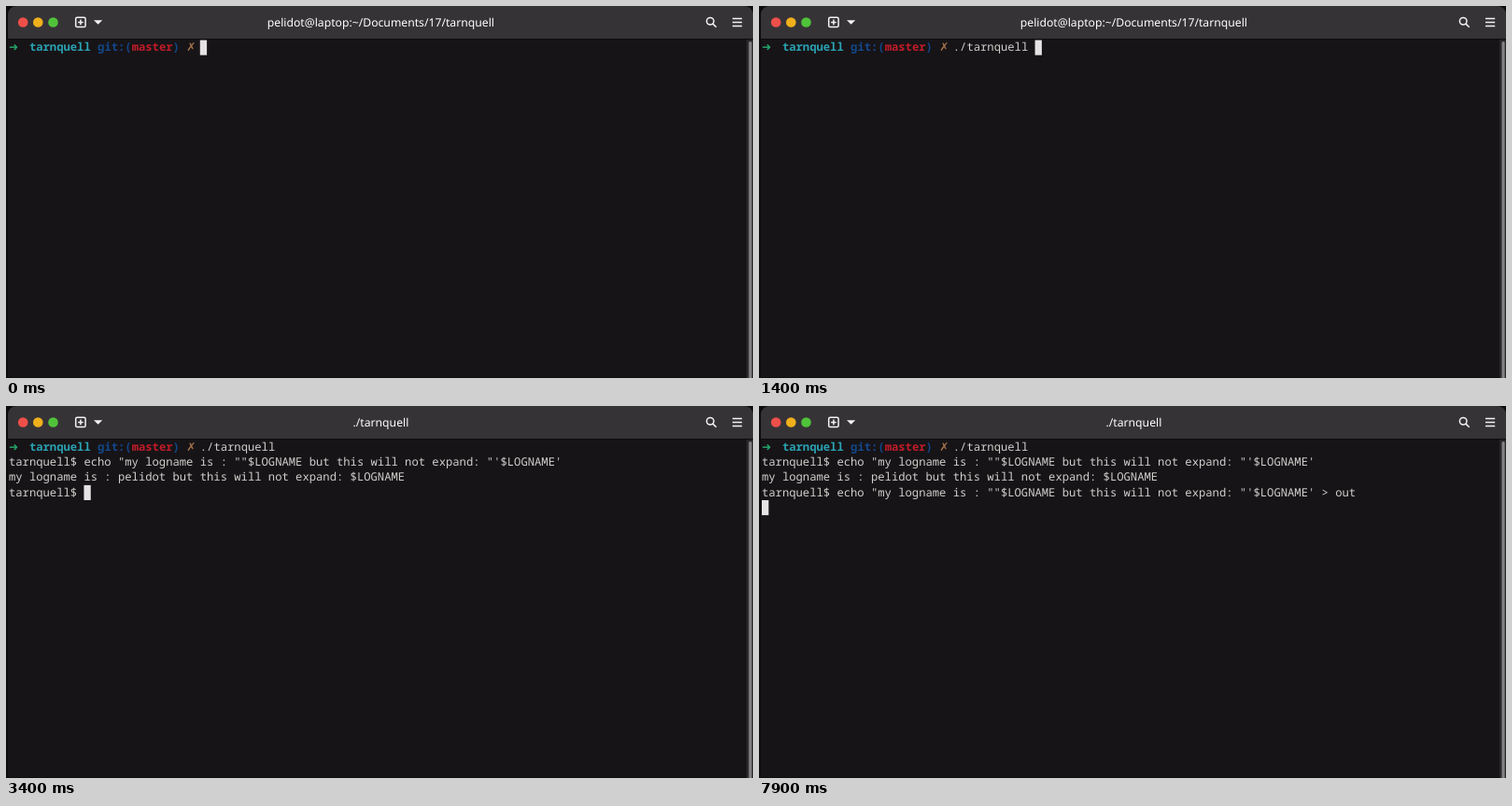
These frames come from a looping animation (800x399 px, 8000 ms). An HTML page:

```html
<!DOCTYPE html>
<html lang="en">
<head>
<meta charset="utf-8">
<title>Terminal</title>
<style>
  html, body { margin: 0; width: 100%; height: 100%; overflow: hidden; background: #171417; }
  svg { display: block; width: 100vw; height: 100vh; }
  text { white-space: pre; text-rendering: geometricPrecision; }
  .title { font: 12.2px "Noto Sans", "Open Sans", sans-serif; fill: #fff; text-anchor: middle; }
  .term { font: 12.19px "Noto Sans Mono", "DejaVu Sans Mono", monospace; fill: #d0cfcc; }
  .bold { font-weight: 700; }
  .symbol { font-family: "DejaVu Sans", sans-serif; }
  .icon { fill: none; stroke: #f4f3f4; stroke-width: 1.5; }
</style>
</head>
<body>
<svg id="stage" viewBox="0 0 800 399">
  <rect width="800" height="399" fill="#0d0b0d"/>
  <path d="M2 399V9a9 9 0 0 1 9-9H791a9 9 0 0 1 9 9V399Z" fill="#171417"/>
  <path d="M2 35V9a9 9 0 0 1 9-9H791a9 9 0 0 1 9 9V35Z" fill="#363337"/>
  <rect x="2" y="35" width="798" height="1" fill="#0d0b0d"/>
  <rect x="793" y="36" width="7" height="363" fill="#2a272a"/>
  <rect x="795.5" y="38" width="3.2" height="365" rx="1.6" fill="#858285"/>
  <rect x="2" y="398" width="791" height="1" fill="#0d0b0d"/>

  <circle cx="18.2" cy="17.5" r="5.3" fill="#ee5049"/>
  <circle cx="34.3" cy="17.5" r="5.3" fill="#f0b01c"/>
  <circle cx="50.5" cy="17.5" r="5.3" fill="#50c23a"/>
  <g class="icon">
    <rect x="74.7" y="12.2" width="10.4" height="10.4" rx="1.6"/>
    <path d="M79.9 14.6v5.6M77.1 17.4h5.6"/>
    <circle cx="754.2" cy="16.3" r="3.8"/>
    <path d="M757 19.1l3.7 3.7M778 13.6h10.2M778 17.5h10.2M778 21.4h10.2"/>
  </g>
  <path d="M94 15.2h9.2l-4.6 4.6Z" fill="#f4f3f4"/>
  <text id="title" class="title" x="401.4" y="22.3"></text>
  <g id="term" class="term"></g>
</svg>
<script>
const DURATION = 8000;
const LEFT = 3, TOP = 36.6, CELL = 7.314, PITCH = 16.1;
const NAME = 'tarnquell', USER = 'pelidot';
const PROMPT = NAME + '$ ';
const COMMAND = `echo "my logname is : ""$LOGNAME but this will not expand: "'$LOGNAME'`;
const RUN = './' + NAME;
const INPUT_COL = 28;

const history = [
  RUN,
  PROMPT + COMMAND,
  `my logname is : ${USER} but this will not expand: $LOGNAME`,
  PROMPT + COMMAND + ' > out'
];

// start time, active row, text on that row, pasted text highlighted
const steps = [
  [0, 0, ''],
  ...[500, 600, 1000, 1100, 1200].map((t, i) => [t, 0, RUN.slice(0, i + 1)]),
  [1400, 0, RUN + ' '],
  [1600, 1, ''],
  [1700, 1, PROMPT],
  [2700, 1, PROMPT + COMMAND, true],
  [3400, 3, PROMPT],
  ...[6500, 6700, 6900, 7100, 7300, 7400, 7500].map((t, i) =>
    [t, 3, PROMPT + COMMAND + ' > out'.slice(0, i)]),
  [7900, 4, '']
];

const term = document.getElementById('term');
const title = document.getElementById('title');
const colX = col => LEFT + col * CELL;
const rowY = row => TOP + row * PITCH;

function add(tag, attrs, content = '') {
  const el = document.createElementNS('http://www.w3.org/2000/svg', tag);
  for (const key in attrs) el.setAttribute(key, attrs[key]);
  el.textContent = content;
  return term.appendChild(el);
}

const addText = (col, row, content = '', attrs = {}) =>
  add('text', { x: colX(col), y: rowY(row) + 11.6, ...attrs }, content);

[
  [0, '➜', '#26a269', 'bold symbol'],
  [3, NAME, '#2aa1b3', 'bold'],
  [13, 'git:(', '#12488b', 'bold'],
  [18, 'master', '#c01c28', 'bold'],
  [24, ')', '#12488b', 'bold'],
  [26, '✗', '#a2734c', 'symbol']
].forEach(([col, content, fill, style]) => addText(col, 0, content, { fill, class: style }));

const lines = history.map((_, row) => addText(row ? 0 : INPUT_COL, row));
const block = add('rect', { height: PITCH });
const pasted = addText(PROMPT.length, 1, COMMAND, { fill: '#171417' });

function render(time) {
  const [, row, typed, highlighted] = steps.findLast(step => step[0] <= time);
  lines.forEach((line, i) => {
    line.textContent = i < row ? history[i] : i > row ? '' : highlighted ? PROMPT : typed;
  });
  const end = (row ? 0 : INPUT_COL) + typed.length;
  const start = highlighted ? PROMPT.length : end;
  block.setAttribute('x', colX(start));
  block.setAttribute('y', rowY(row));
  block.setAttribute('width', (end + 1 - start) * CELL);
  block.setAttribute('fill', highlighted ? '#dcdad9' : '#e6e3e4');
  pasted.setAttribute('visibility', highlighted ? 'visible' : 'hidden');
  title.textContent = row ? RUN : `${USER}@laptop:~/Documents/17/${NAME}`;
}

function tick() {
  render(performance.now() % DURATION);
  requestAnimationFrame(tick);
}
tick();
</script>
</body>
</html>
```
